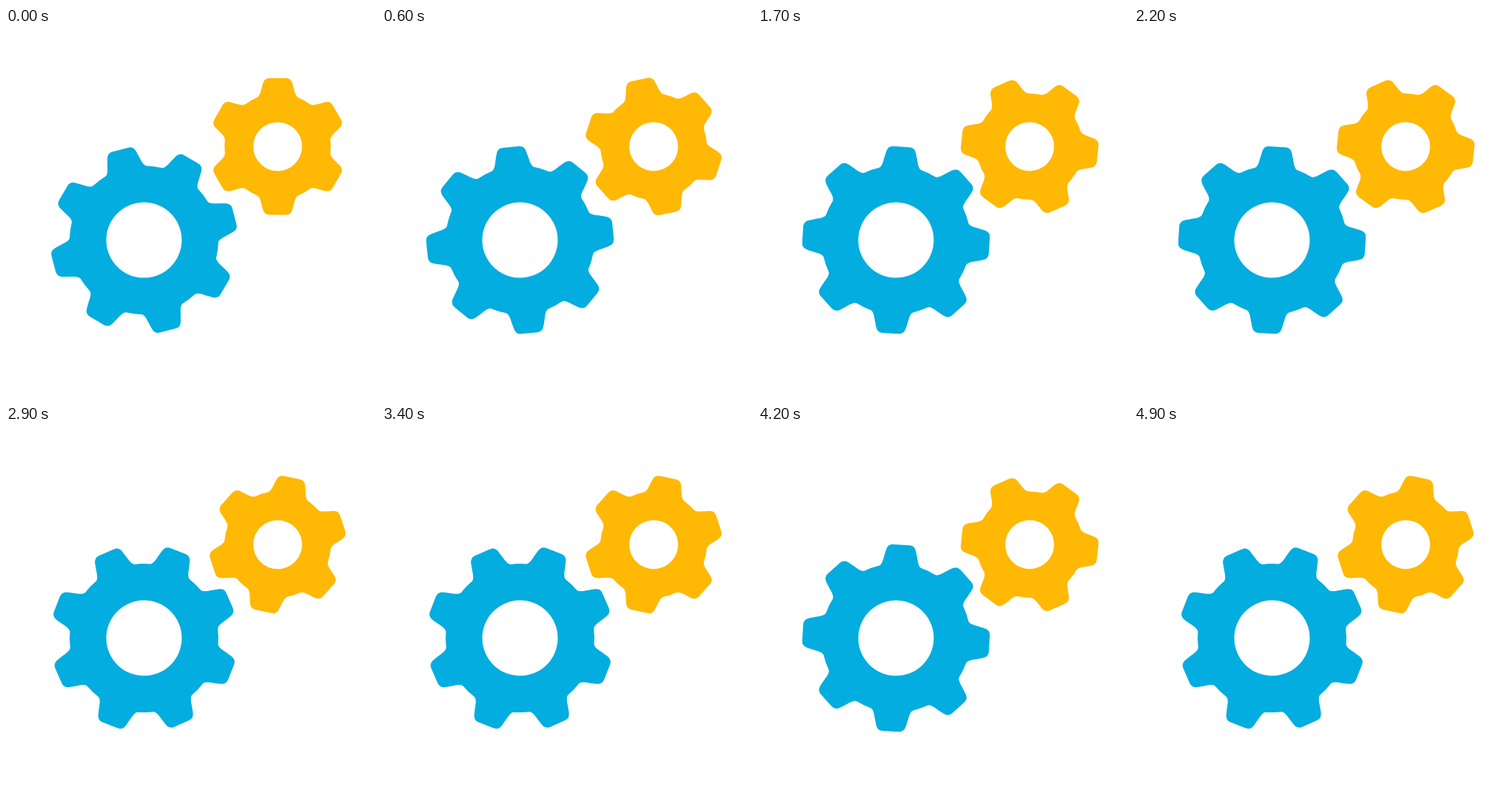
These frames come from a looping animation (500 px wide and 500 px high, 5.01 s). An HTML page:

```html
<!DOCTYPE html>
<html lang="en">
<head>
<meta charset="utf-8">
<title>Gears</title>
<style>
  html, body { margin: 0; height: 100%; overflow: hidden; background: #fff; }
  svg { display: block; width: 100%; height: 100%; }
</style>
</head>
<body>
<svg viewBox="0 0 500 500"></svg>
<script>
const LOOP = 5010, STEP = 100, LAST = 49;
const svg = document.querySelector('svg');

// Outline of a gear around 0,0 with the first tooth pointing up.
function gearPath(teeth, tip, root, hole) {
  const foot = 28.5, base = Math.sqrt(root * root - foot * foot);
  let d = '';
  for (let i = 0; i < teeth; i++) {
    const a = i * 2 * Math.PI / teeth, c = Math.cos(a), s = Math.sin(a);
    const p = (x, r) => `${(x * c + r * s).toFixed(2)} ${(x * s - r * c).toFixed(2)} `;
    d += (i ? `A${root} ${root} 0 0 1 ` : 'M') + p(-foot, base)
      + 'Q' + p(-24.6, base + 1.4) + p(-22.5, tip - 17)
      + 'L' + p(-20.2, tip - 8)
      + 'Q' + p(-18.3, tip) + p(-11, tip)
      + 'L' + p(11, tip)
      + 'Q' + p(18.3, tip) + p(20.2, tip - 8)
      + 'L' + p(22.5, tip - 17)
      + 'Q' + p(24.6, base + 1.4) + p(foot, base);
  }
  d += `A${root} ${root} 0 0 1 ` + `${-foot} ${-base}Z`;
  return d + `M${-hole} 0a${hole} ${hole} 0 1 0 ${2 * hole} 0a${hole} ${hole} 0 1 0 ${-2 * hole} 0Z`;
}

function makeGear({ x, y, teeth, tip, root, hole, color, start, turn }) {
  const el = document.createElementNS('http://www.w3.org/2000/svg', 'path');
  el.setAttribute('d', gearPath(teeth, tip, root, hole));
  el.setAttribute('fill', color);
  el.setAttribute('fill-rule', 'evenodd');
  svg.append(el);
  return n => el.setAttribute('transform', `translate(${x} ${y}) rotate(${start + turn * n})`);
}

const gears = [
  makeGear({ x: 186.5, y: 286.6, teeth: 8, tip: 126.3, root: 100.5, hole: 51,
             color: '#03addf', start: -14.7, turn: 9 }),
  makeGear({ x: 367.1, y: 160.2, teeth: 6, tip: 92.4, root: 71.8, hole: 33,
             color: '#ffb803', start: 0, turn: -12 })
];

// The gears turn in ticks, one tooth every five steps.
function draw() {
  const n = Math.min(LAST, Math.floor(performance.now() % LOOP / STEP));
  gears.forEach(pose => pose(n));
  requestAnimationFrame(draw);
}
draw();
</script>
</body>
</html>
```
